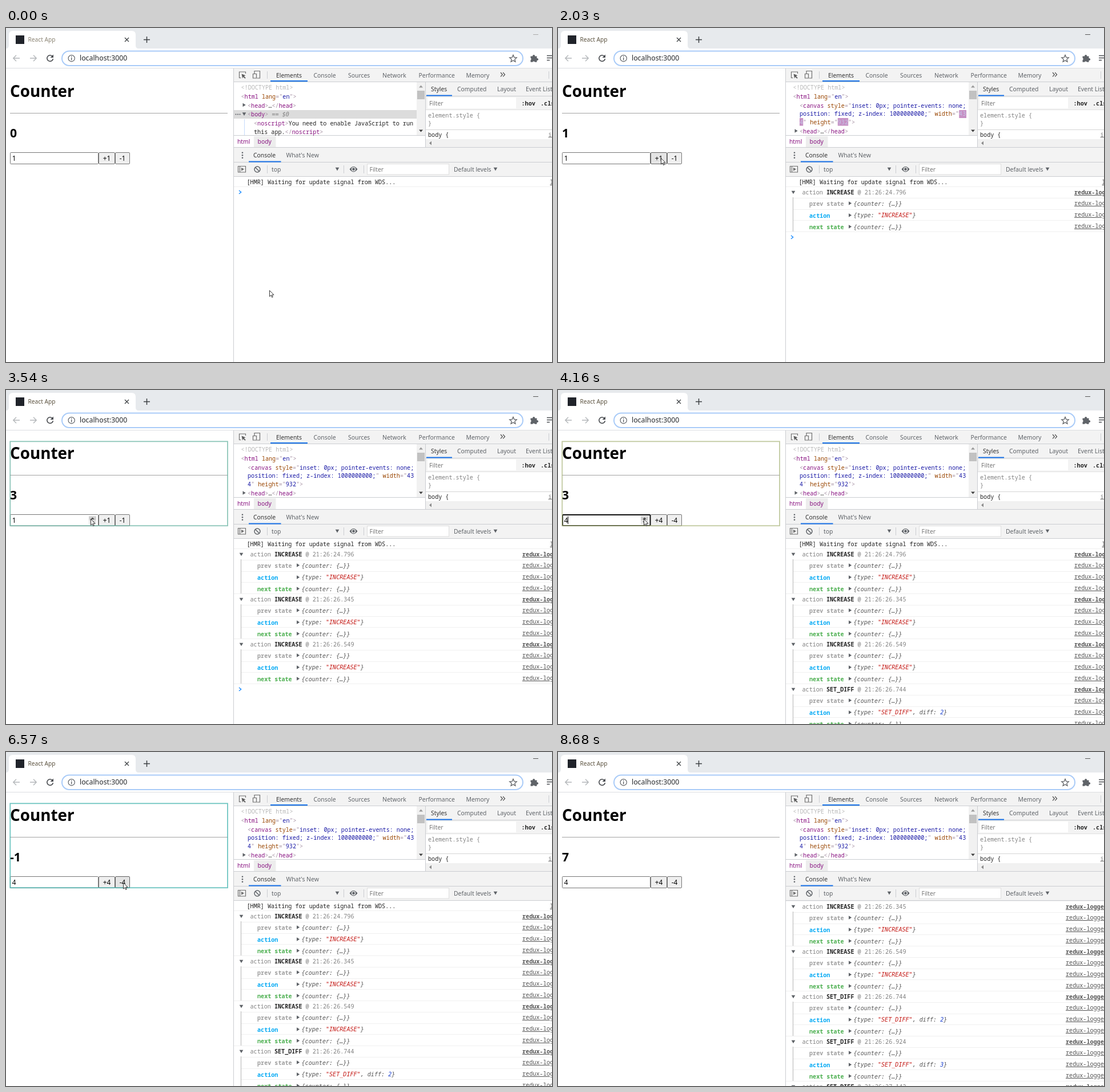
These frames come from a looping animation (956 px wide and 586 px high, 8920 ms). An HTML page:

```html
<!DOCTYPE html>
<html lang="en">
<head>
<meta charset="utf-8">
<title>Counter</title>
<style>
html, body { margin: 0; width: 100%; height: 100%; overflow: hidden; background: #fff; }
svg { display: block; width: 100vw; height: 100vh; }
text { white-space: pre; font-family: 'Noto Sans', 'Open Sans', sans-serif; }
.m { font: 10.12px 'Noto Sans Mono', 'DejaVu Sans Mono', monospace; }
.b { font-weight: 700; }
.i { font: italic 10.08px 'DejaVu Sans Mono', monospace; }
.u { text-decoration: underline; }
.p { fill: #a894a6; } .t { fill: #881280; } .a { fill: #994500; } .v { fill: #1a1aa6; }
.k { fill: #222; } .g { fill: #808080; } .o { fill: #565656; } .s { fill: #c41a16; } .n { fill: #1c40cf; }
</style>
</head>
<body>
<svg id="stage" viewBox="0 0 956 586" xmlns="http://www.w3.org/2000/svg"></svg>
<script>
const LOOP = 8920;
const GREY = '#5f6368', BLUE = '#1a73e8', LINE = '#cbcdd1', BAR = '#f3f3f3';
const ROW = 79;

const esc = s => String(s).replace(/&/g, '&amp;').replace(/</g, '&lt;');
const text = (x, y, s, fill = GREY, size = 10.4, attrs = '') =>
  `<text x="${x}" y="${y}" fill="${fill}" font-size="${size}" ${attrs}>${esc(s)}</text>`;
const mono = (x, y, s, cls = 'k', attrs = '') =>
  `<text x="${x}" y="${y}" class="m ${cls}" ${attrs}>${esc(s)}</text>`;
const rect = (x, y, w, h, fill, attrs = '') =>
  `<rect x="${x}" y="${y}" width="${w}" height="${h}" fill="${fill}" ${attrs}/>`;
const path = (d, fill, attrs = '') => `<path d="${d}" fill="${fill}" ${attrs}/>`;
const stroke = (d, color, w = 1) => path(d, 'none', `stroke="${color}" stroke-width="${w}"`);
const hline = (x1, x2, y, color = LINE) => rect(x1, y, x2 - x1, 1, color);
const vline = (x, y1, y2, color = LINE) => rect(x, y1, 1, y2 - y1, color);
const down = (x, y, fill = GREY, r = 3.3) => path(`M${x - r} ${y - r * .8}h${2 * r}l${-r} ${r * 1.7}z`, fill);
const right = (x, y, fill = GREY) => path(`M${x - 2.5} ${y - 3.2}v6.4l5.2 -3.2z`, fill);

// parts alternate class and string
function code(x, y, ...parts) {
  let s = '';
  for (let i = 0; i < parts.length; i += 2) s += `<tspan class="${parts[i]}">${esc(parts[i + 1])}</tspan>`;
  return `<text x="${x}" y="${y}" class="m">${s}</text>`;
}

function browser() {
  return rect(0, 0, 956, 36, '#e7eaed') +
    path('M0 36q5 0 5 -6V12q0 -7 7 -7H220q7 0 7 7V30q0 6 5 6z', '#fff') +
    rect(17, 13, 15, 15, '#20232a') +
    stroke('M208 17l7 7m0 -7l-7 7', '#3c4043', 1.3) +
    stroke('M241 20.5h11m-5.5 -5.5v11', '#3c4043', 1.5) +
    rect(0, 36, 956, 34, '#fff') + hline(0, 956, 70, '#dcdee1') +
    stroke('M24 53H13m5 -5.2l-5.2 5.2 5.2 5.2', '#b4b7ba', 1.4) +
    stroke('M42 53h11m-5 -5.2l5.2 5.2 -5.2 5.2', '#b4b7ba', 1.4) +
    stroke('M81.5 50a5.3 5.3 0 1 0 .9 4', '#4a4d51', 1.6) + path('M83 46.5v5.5h-5.5z', '#4a4d51') +
    rect(98, 40.5, 807, 25.5, '#fff', 'rx="12.7" stroke="#a9cbf8" stroke-width="2"') +
    '<circle cx="114.7" cy="53.2" r="5.6" fill="none" stroke="#5f6368" stroke-width="1.2"/>' +
    rect(114, 52, 1.4, 4.4, GREY) + rect(114, 49.6, 1.4, 1.4, GREY) +
    text(129, 57, 'localhost:3000', '#25282c', 12.3) +
    stroke('M888 47.3l1.8 4.3 4.5 .3 -3.5 3 1.1 4.4 -3.9 -2.4 -3.9 2.4 1.1 -4.4 -3.5 -3 4.5 -.3z', '#55585c', 1.2) +
    path('M918.5 49.5h3.7a2 2 0 1 1 3.8 0h3.5v3.6a2 2 0 1 1 0 3.8v2.9h-3.6a2 2 0 0 0 -3.8 0h-3.6v-3.6a2 2 0 0 0 0 -3.6z', GREY) +
    stroke('M947 48.5h9m-9 4h9m-9 4h5', '#4d5054', 1.5);
}

function devtools() {
  const tab = (x, s, on) => text(x, 86.5, s, on ? '#333' : GREY);
  return rect(399, 71, 557, 23, BAR) + vline(398, 71, 586) + hline(399, 956, 94) +
    stroke('M411.5 87.5h-3v-10.5h11v3', '#6e6e6e', 1.2) + path('M412.5 80.5l7 2.8 -2.8 1.2 3 3 -1.3 1.3 -3 -3 -1.2 2.8z', '#5a5a5a') +
    stroke('M435 80v-4.5h9.5v12.5h-5M432.5 80.5h6v7.5h-6z', '#6e6e6e', 1.2) +
    vline(457, 76, 89) + vline(950, 76, 89) +
    tab(473, 'Elements', 1) + tab(538.5, 'Console') + tab(599, 'Sources') + tab(659, 'Network') +
    tab(722.5, 'Performance') + tab(805.5, 'Memory') +
    stroke('M866 78l3.3 3.7 -3.3 3.7m4.2 -7.4l3.3 3.7 -3.3 3.7', '#555', 1.3) +
    rect(463, 92, 65, 2, BLUE) +
    mono(411.5, 108, '<!DOCTYPE html>', '', 'fill="#b8b8b8"') +
    code(411.5, 124, 'p', '<', 't', 'html ', 'a', 'lang', 'p', '="', 'v', 'en', 'p', '">') +
    rect(719, 95, 15, 93, '#f1f1f1') + rect(720, 110, 13, 15, '#c1c1c1') +
    path('M723 104.5h7l-3.5 -4z', '#999') + path('M723 178.5h7l-3.5 4z', '#404040') +
    vline(734, 95, 209) +
    hline(399, 735, 188) + rect(434, 190, 38.5, 19, '#ededed') +
    text(405, 203, 'html', '#881280', 10.3) + text(440.5, 203, 'body', '#881280', 10.4);
}

function styles() {
  return rect(735, 95, 221, 24, BAR) + hline(735, 956, 119) +
    text(744, 111, 'Styles', '#333') + text(790, 111, 'Computed') + text(860, 111, 'Layout') +
    text(910, 111, 'Event Listeners') + rect(736, 117.5, 45, 2, BLUE) +
    rect(735, 120, 221, 23, BAR) + rect(738, 122, 155, 19, '#fff') +
    text(741, 136, 'Filter', '#777') + mono(902.5, 135.5, ':hov', 'k b') + mono(936, 135.5, '.cls', 'k b') +
    hline(735, 956, 143, '#e0e0e0') +
    mono(739, 156.5, 'element.style {', 'g') + mono(739, 171, '}', 'g') +
    hline(735, 956, 178, '#d5d5d5') + mono(739, 190.5, 'body {') + mono(949.5, 190.5, 'index', 'g u') +
    rect(735, 195, 221, 14, '#f1f1f1') + path('M745 198.5v7l-4 -3.5z', '#8a8a8a');
}

function drawer() {
  const dot = y => `<circle cx="414" cy="${y}" r="1.3" fill="${GREY}"/>`;
  return hline(399, 956, 209) + rect(399, 210, 557, 50, BAR) + hline(399, 956, 235) + hline(399, 956, 260) +
    dot(218.7) + dot(223.2) + dot(227.7) +
    text(433, 227, 'Console', '#333') + text(490.5, 227, "What's New") + rect(425, 233.5, 56.5, 2, BLUE) +
    stroke('M406.5 242.5h13v10.5h-13zM409.5 242.5v10.5', '#6e6e6e', 1.2) + path('M412 244.8v6l5 -3z', '#6e6e6e') +
    `<circle cx="440" cy="248" r="5" fill="none" stroke="${GREY}" stroke-width="1.5"/>` +
    stroke('M436.5 244.5l7 7', GREY, 1.5) +
    vline(457, 241, 255) + vline(591, 241, 255) + vline(626, 241, 255) +
    text(465, 252, 'top') + down(580, 247.5) + down(857, 247.5) +
    path('M601.5 247.7q7 -9.5 14 0q-7 9.5 -14 0z', GREY) +
    `<circle cx="608.5" cy="247.7" r="3" fill="${GREY}" stroke="${BAR}" stroke-width="1.3"/>` +
    rect(632.5, 238.5, 143, 18.5, '#fff', 'stroke="#dedede"') + text(636.5, 252, 'Filter', '#777') +
    text(784, 252, 'Default levels');
}

function page() {
  return text(7, 121, 'Counter', '#000', 27.8, 'class="b"') + hline(7, 388, 149, '#a2a2a2');
}

const treeBefore = rect(399, 144, 320, 15, '#dcdcdc') +
  right(417, 135) + code(423, 139.5, 'p', '<', 't', 'head', 'p', '>', 'k', '…', 'p', '</', 't', 'head', 'p', '>') +
  [402.5, 406, 409.5].map(x => `<circle cx="${x}" cy="151.5" r="1.1" fill="${GREY}"/>`).join('') + down(417, 151) +
  code(423, 155, 'p', '<', 't', 'body', 'p', '>', 'g i', ' == $0') +
  vline(417, 160, 188, '#c6dafc') +
  code(434, 171, 'p', '<', 't', 'noscript', 'p', '>', 'k', 'You need to enable JavaScript to run') +
  code(434, 186, 'k', 'this app.', 'p', '</', 't', 'noscript', 'p', '>');

const treeAfter = ['M702.2 144h12.8v14h-12.8z', 'M423 158h6.2v13.5h-6.2z', 'M489.8 158h18.4v13.5h-18.4z']
    .map(d => path(d, '#881280', 'class="flash" opacity="0"')).join('') +
  code(423, 139.5, 'p', '<', 't', 'canvas ', 'a', 'style', 'p', '="', 'v', 'inset: 0px; pointer-events: none;') +
  code(423, 154, 'v', 'position: fixed; z-index: 1000000000;', 'p', '" ', 'a', 'width', 'p', '="', 'v size', '43') +
  code(423, 169, 'v size', '4', 'p', '" ', 'a', 'height', 'p', '="', 'v size', '932', 'p', '">') +
  right(417, 180.5) + code(423, 185, 'p', '<', 't', 'head', 'p', '>', 'k', '…', 'p', '</', 't', 'head', 'p', '>');

const LOG = [['INCREASE', '24.796'], ['INCREASE', '26.345'], ['INCREASE', '26.549'],
  ['SET_DIFF', '26.744', 2], ['SET_DIFF', '26.924', 3], ['SET_DIFF', '27.142', 4]];

function entry([type, time, diff], i, linkX) {
  const link = (y, cls = '') => mono(linkX, y, 'redux-logger.js:1', 'o u ' + cls);
  const label = (y, s, fill) => `<text x="440" y="${y}" class="m b" fill="${fill}">${s}</text>` + right(511.5, y - 4.5);
  const state = ['o i', '{counter: {…}}'];
  const action = ['o i', '{type: ', 's i', `"${type}"`];
  if (diff) action.push('o i', ', diff: ', 'n i', diff);
  action.push('o i', '}');
  return `<g transform="translate(0 ${i * ROW})">` +
    down(412, 288.3) + code(427.5, 292, 'g', 'action ', 'k b', type, 'g', ' @ 21:26:' + time) + link(292, 'b') +
    stroke('M411.5 297v60.5h3', '#b5b5b5') +
    [298, 318, 337, 357].map(y => hline(y === 357 ? 399 : 412, 956, y, '#f0f0f0')).join('') +
    label(312, 'prev state', '#9e9e9e') + code(517.5, 312, ...state) + link(311) +
    label(333, 'action', '#03a9f4') + code(517.5, 332, ...action) + link(331) +
    label(353, 'next state', '#4caf50') + code(517.5, 353, ...state) + link(351) + '</g>';
}

function consoleLog(count, scroll) {
  const y = 284.3 + count * ROW;
  return `<g transform="translate(0 ${-scroll})">` +
    mono(421.5, 274, '[HMR] Waiting for update signal from WDS...') + mono(scroll ? 937 : 952.5, 274, 'log.js:24', 'o u') +
    hline(399, 956, 278, '#f0f0f0') +
    LOG.slice(0, count).map((e, i) => entry(e, i, scroll ? 889 : 904)).join('') +
    stroke(`M408 ${y + .7}l3.6 3 -3.6 3`, '#1a8cff', 1.4) + '</g>';
}

function button(x, w, label, state) {
  const fill = { hover: '#e4e4e4', active: '#f5f5f5' }[state] || '#efefef';
  return rect(x + .5, 218.5, w, 20, fill, `rx="1.5" stroke="${state ? '#606060' : '#767676'}"`) +
    text(x + .5 + w / 2, 233, label, '#000', 11.8, 'text-anchor="middle"');
}

function form(s) {
  const frame = s.focus ? rect(8, 219, 153.5, 19, '#fff', 'rx="1" stroke="#101010" stroke-width="2"')
    : rect(7.5, 218.5, 154, 20, '#fff', 'rx="1" stroke="#767676"');
  return text(7, 192, s.total, '#000', 21.2, 'class="b"') + frame +
    text(10.8, 233, s.diff, '#000', 11.8) +
    (s.caret ? rect(17, 221.5, 1, 13.5, '#000') : '') +
    (s.spin ? rect(145, 221.5, 13, 14, '#e6e6e6') + rect(145, 221.5, 13, 7, '#cfcfcf') +
      path('M148 227h7l-3.5 -3.6zM148 230.5h7l-3.5 3.6z', '#505050') : '') +
    button(162, 28, '+' + s.diff, s.plus) + button(191, 25, '-' + s.diff, s.minus) +
    (s.outline ? rect(7.3, 90.3, 380.7, 147.9, 'none', `stroke="${s.outline}" stroke-width="1.8" stroke-opacity=".72"`) : '');
}

const HEAT = ['#37afa9', '#63b19e', '#80b393', '#97b488', '#abb67d'];

// value of the last step reached; steps alternate time and value
function step(t, ...steps) {
  let v = steps[1];
  for (let i = 0; i < steps.length; i += 2) if (t >= steps[i]) v = steps[i + 1];
  return v;
}
const within = (t, a, b) => t >= a && t < b;

function stateAt(t) {
  const focus = within(t, 3700, 5480);
  return {
    total: step(t, 0, 0, 1720, 1, 3300, 2, 3540, 3, 6570, -1, 8220, 3, 8370, 7),
    diff: step(t, 0, 1, 3700, 2, 3920, 3, 4080, 4),
    focus,
    caret: focus && !within(t, 4660, 5160),
    spin: within(t, 3540, 5480),
    plus: step(t, 0, '', 630, 'hover', 3540, '', 7000, 'hover', 7510, ''),
    minus: step(t, 0, '', 4780, 'hover', 5480, 'active', 5560, 'hover', 6890, ''),
    outline: HEAT[step(t, 0, -1, 1720, 0, 1970, -1, 3300, 0, 3540, 1, 3700, 2, 3920, 3, 4080, 4,
      4470, -1, 6570, 0, 6810, -1, 8220, 0, 8370, 1, 8680, -1)]
  };
}

const PATH = [[0, 461, 460], [70, 461, 460], [710, 180, 229], [860, 179, 227.5], [1010, 180, 228], [3490, 180, 228],
  [3540, 148, 226], [3920, 150, 226], [4470, 150, 226], [4620, 178, 243], [4860, 205, 229], [6810, 205, 229],
  [7130, 179, 230], [7430, 178, 229], [7830, 286, 477], [7990, 286, 477], [8140, 446.5, 574], [8220, 510, 620], [LOOP, 510, 620]];

function cursorAt(t) {
  const i = PATH.findIndex(k => k[0] > t);
  const [t0, x0, y0] = PATH[i - 1], [t1, x1, y1] = PATH[i];
  const p = (t - t0) / (t1 - t0), e = p * p * (3 - 2 * p);
  return [x0 + (x1 - x0) * e, y0 + (y1 - y0) * e];
}

const stage = document.getElementById('stage');
stage.innerHTML = '<clipPath id="log-clip"><rect x="399" y="261" width="557" height="325"/></clipPath>' +
  rect(0, 0, 956, 586, '#fff') + browser() + page() + devtools() + styles() + drawer() +
  '<g id="title"></g><g id="form"></g><g id="before">' + treeBefore + '</g><g id="after">' + treeAfter + '</g>' +
  '<g clip-path="url(#log-clip)"><g id="log"></g></g>' +
  path('M.5 .5v10.6l2.5 -2.3 1.7 3.8 1.6 -.7 -1.7 -3.7h3.4z', '#fff', 'id="cursor" stroke="#222" stroke-width=".9"');

const el = id => document.getElementById(id);
const flashes = stage.querySelectorAll('.flash'), sizes = stage.querySelectorAll('.size');
const cache = {};
function fill(id, key, make) {
  if (cache[id] === key) return;
  cache[id] = key;
  el(id).innerHTML = make();
}

function draw(t) {
  const active = t >= 70;
  fill('title', active, () => text(38.5, 24.3, 'React App', active ? '#5c5340' : '#8b8474', 10.2) +
    hline(923, 932, 11, active ? '#555' : '#aaa'));

  const s = stateAt(t);
  fill('form', JSON.stringify(s), () => form(s));

  const count = step(t, 0, 0, 1720, 1, 3300, 2, 3540, 3, 3700, 6);
  const scroll = step(t, 0, 0, 8220, 17, 8450, 96);
  fill('log', count + '/' + scroll, () => consoleLog(count, scroll));

  const inserted = t >= 1720;
  el('before').style.display = inserted ? 'none' : '';
  el('after').style.display = inserted ? '' : 'none';
  const a = within(t, 1720, 2580) ? (1 - (t - 1720) / 860) ** 1.7 : 0;
  const mix = c => Math.round(c + (255 - c) * Math.min(1, a * 1.6));
  flashes.forEach(f => f.setAttribute('opacity', a));
  sizes.forEach(f => f.style.fill = `rgb(${mix(26)},${mix(26)},${mix(166)})`);

  el('cursor').setAttribute('transform', `translate(${cursorAt(t)})`);
}

const start = performance.now();
function tick() {
  draw((performance.now() - start) % LOOP);
  requestAnimationFrame(tick);
}
tick();
</script>
</body>
</html>
```
